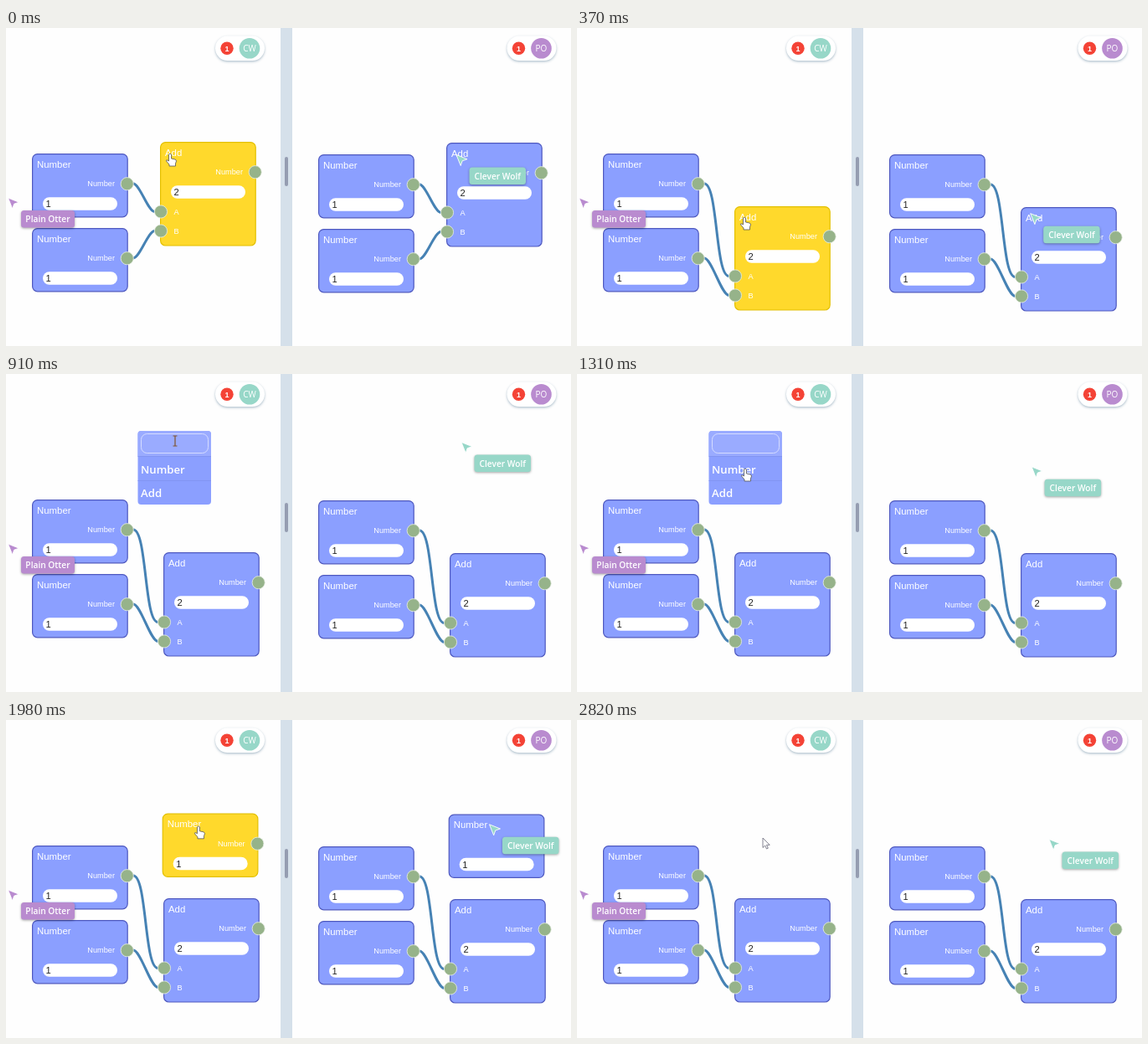
Animation of 675x380 px, one loop 3170 ms. Source, as an HTML page with a canvas:

```html
<!DOCTYPE html>
<html lang="en">
<head>
<meta charset="utf-8">
<title>Shared node editor</title>
<style>
  html, body { margin: 0; width: 100%; height: 100%; overflow: hidden; background: #fff; }
  canvas { display: block; }
</style>
</head>
<body>
<canvas id="stage" width="675" height="380"></canvas>
<script>
const ctx = document.getElementById('stage').getContext('2d');
const LOOP = 3170, STEP = 90, LAG = 100;
const SANS = '"Liberation Sans", Arial, sans-serif', UI = '"Open Sans", sans-serif';
const TEAL = '#97d7c8', PURPLE = '#b98bcf', BLUE = '#8b9fff';

const clamp = p => Math.min(1, Math.max(0, p));
const easeOut = p => 1 - (1 - p) ** 2;

// Each leg eases from the current position to its end: { from, to, end }.
function travel(start, legs, t) {
  return legs.reduce(([x, y], { from, to, end }) => {
    const p = easeOut(clamp((t - from) / (to - from)));
    return [x + (end[0] - x) * p, y + (end[1] - y) * p];
  }, start);
}

const dragAdd = { from: 0, to: 360 }, dragNew = { from: 1830, to: 2200 };
const addAt = t => travel([184, 136], [{ ...dragAdd, end: [188, 213] }], t);
const createdAt = t => travel([197, 107], [{ ...dragNew, end: [181, 114] }], t);
const pointerAt = t => travel([196, 150], [
  { ...dragAdd, end: [200, 226] },
  { from: 540, to: 800, end: [202, 80] },      // open the menu
  { from: 1080, to: 1200, end: [201, 113] },   // pick an entry
  { from: 1450, to: 1530, end: [239, 121] },   // reach the new node
  { ...dragNew, end: [225, 130] },
  { from: 2270, to: 2500, end: [222, 141] },
], t);

function paint(fill, stroke, width = 1) {
  if (fill) { ctx.fillStyle = fill; ctx.fill(); }
  if (stroke) { ctx.strokeStyle = stroke; ctx.lineWidth = width; ctx.stroke(); }
}

function box(x, y, w, h, r, fill, stroke, width) {
  ctx.beginPath();
  ctx.roundRect(x, y, w, h, r);
  paint(fill, stroke, width);
}

function disc(x, y, r, fill, stroke) {
  ctx.beginPath();
  ctx.arc(x, y, r, 0, 7);
  paint(fill, stroke, 0.8);
}

function shape(x, y, d, fill, stroke, width) {
  ctx.save();
  ctx.translate(x, y);
  const path = new Path2D(d);
  ctx.lineJoin = 'round';
  ctx.fillStyle = fill;
  ctx.strokeStyle = stroke;
  ctx.lineWidth = width;
  ctx.fill(path);
  ctx.stroke(path);
  ctx.restore();
}

function text(str, x, y, size, { color = '#fff', font = SANS, align = 'left', weight = '' } = {}) {
  ctx.font = `${weight} ${size}px ${font}`;
  ctx.fillStyle = color;
  ctx.textAlign = align;
  ctx.fillText(str, x, y);
}

function withShadow(color, blur, dy, draw) {
  ctx.save();
  Object.assign(ctx, { shadowColor: color, shadowBlur: blur, shadowOffsetY: dy });
  draw();
  ctx.restore();
}

const socket = (x, y) => disc(x, y, 7.6, '#96b38a', '#e9efe6');

function node(title, [x, y], value, selected, inputs = []) {
  box(x + 0.6, y + 0.6, 113.6, inputs.length ? 123.4 : 75.2, 6,
    selected ? '#ffd92c' : BLUE, selected ? '#e3c000' : '#4e58bf', 1.2);
  text(title, x + 6, y + 16.5, 11.4);
  text('Number', x + 99, y + 39, 9.2, { align: 'right' });
  socket(x + 113.7, y + 36.2);
  box(x + 13, y + 52.3, 89, 15.5, 7.7, '#fff');
  text(value, x + 16.5, y + 64, 11.2, { color: '#222' });
  inputs.forEach((name, i) => {
    socket(x + 1, y + 83.5 + i * 23);
    text(name, x + 16.5, y + 86.7 + i * 23, 9.2);
  });
}

function wire(x1, y1, x2, y2) {
  const bend = Math.max(Math.abs(y2 - y1) / 2, Math.abs(x2 - x1)) * 0.3;
  ctx.beginPath();
  ctx.moveTo(x1, y1);
  ctx.bezierCurveTo(x1 + bend, y1, x2 - bend, y2, x2, y2);
  paint(null, 'steelblue', 3);
}

function graph(t, dx, dy, local) {
  const add = addAt(t), [ax, ay] = add;
  ctx.save();
  ctx.translate(dx, dy);
  [0, 1].forEach(i => wire(152, 186 + i * 89, ax - 6.5, ay + 83.5 + i * 23));
  [0, 1].forEach(i => node('Number', [31, 150 + i * 89], '1'));
  node('Add', add, '2', local && t < 740, ['A', 'B']);
  if (t >= 1300 && t < 2500) node('Number', createdAt(t), '1', local && t >= 1750);
  ctx.restore();
}

function menu() {
  box(157.5, 68, 87.5, 88, 4, BLUE);
  box(157.5, 68, 87.5, 30, [4, 4, 0, 0], '#9aabff');
  box(161.5, 71.5, 80, 23, 7, null, '#d5dcff');
  ['Number', 'Add'].forEach((entry, i) => {
    ctx.fillStyle = '#8295f2';
    ctx.fillRect(157.5, 98 + i * 29, 87.5, 1);
    text(entry, 161, 118.7 + i * 28.5, 13.2, { font: UI, weight: 600 });
  });
}

function badge(x, initials, color) {
  withShadow('rgba(70,110,140,.45)', 3, 1.2, () => box(x + 1, 9.5, 59, 29.5, 14.7, '#fff'));
  disc(x + 15, 24.3, 7.7, '#f44336');
  text('1', x + 15, 27.6, 9, { align: 'center', weight: 'bold' });
  disc(x + 42, 24.3, 12.3, color);
  text(initials, x + 42, 28, 10, { align: 'center', font: UI });
}

function peer(x, y, name, width, color) {
  shape(x, y, 'M0 0L13 5.2L7.2 7.2L5.2 13Z', color, '#fff', 0.9);
  withShadow('rgba(0,0,0,.35)', 3, 1, () => box(x + 15.5, y + 15, width, 20.5, 3.5, color));
  text(name, x + 15.5 + width / 2, y + 29, 10.2, { align: 'center', font: UI, weight: 600 });
}

function pointer(t) {
  const [x, y] = pointerAt(t);
  if (t >= 810 && t < 1110) {
    shape(x, y, 'M-2.5 -6H2.5M0 -6V6M-2.5 6H2.5', 'transparent', '#80542c', 1.2);
  } else if (t < 640 || t >= 1110 && t < 2500) {
    shape(x, y, 'M-1.5 1Q0 -1 1.5 1V6L6 7Q7.5 7.5 7.5 9L6.5 12V15H-1V13L-4.5 9Q-4.5 7 -3 8L-1.5 9Z',
      '#fff', '#555', 0.8);
  } else {
    shape(x, y, 'M0 0V11.5L2.7 9L4.5 13L6.3 12.2L4.5 8.3H8.2Z', '#fff', '#667', 0.8);
  }
}

function draw(t) {
  ctx.fillStyle = '#fefefe';
  ctx.fillRect(0, 0, 675, 380);
  graph(t, 0, 0, true);
  graph(t, 342, 1, false);
  if (t >= 810 && t < 1300) menu();

  ctx.fillStyle = '#d5e0ea';
  ctx.fillRect(328, 0, 14, 380);
  box(333, 154, 4, 35, 2, '#959db1');
  badge(249, 'CW', TEAL);
  badge(597.5, 'PO', PURPLE);

  peer(2.5, 203, 'Plain Otter', 64, PURPLE);
  const [x, y] = pointerAt(t - LAG);
  peer(x + 342, y + 1.5, 'Clever Wolf', 67.5, TEAL);
  pointer(t);
}

function frame() {
  const t = performance.now() % LOOP;
  draw(t - t % STEP);
  requestAnimationFrame(frame);
}
frame();
</script>
</body>
</html>
```
